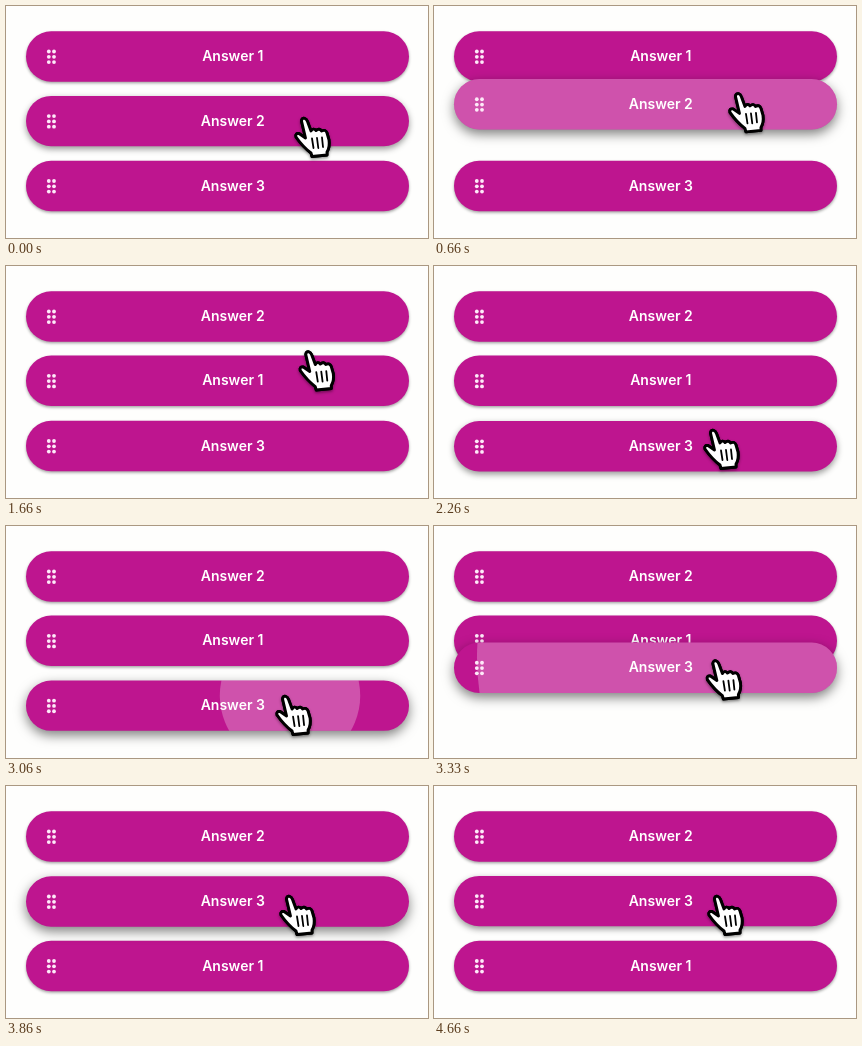
These frames come from a looping animation (422x232 px, 4.73 s). An HTML page with a canvas:

```html
<!DOCTYPE html>
<html lang="en">
<head>
<meta charset="utf-8">
<title>Reorder answers</title>
<style>
  html, body { margin: 0; height: 100%; overflow: hidden; background: #fefefd; }
  canvas { display: block; }
</style>
</head>
<body>
<canvas width="422" height="232"></canvas>
<script>
const LOOP = 4730;
const ROWS = [50.5, 114.8, 180];
const BAR = { x: 20, w: 383, h: 50.4 };
const ctx = document.querySelector('canvas').getContext('2d');

const ramp = (t, a, b) => Math.min(1, Math.max(0, (t - a) / (b - a)));
const ease = (t, a, b) => { const u = ramp(t, a, b); return u * u * (3 - 2 * u); };

// Start value followed by moves of [from ms, to ms, new value]
function track(t, value, ...moves) {
  for (const [a, b, next] of moves) value += (next - value) * ease(t, a, b);
  return value;
}

const hand = new Path2D(`M-2.5 4Q-2 .7 .6 1.3Q2.6 1.8 3.5 4.5L7 14
  Q9.5 10.5 12 13.5Q15.5 10.7 17.5 14Q21.5 12 23 16L25 23Q26 30 23 35
  L23 38L8 39.5L7 36Q-1 30 -8 20Q-9 16 -5 16.5L1.5 21Z`);
const creases = new Path2D('M8 21.5L9.5 31M13 21L14.3 31M18 20.5L19 30');

function shadow(color, y, blur) {
  ctx.shadowColor = color;
  ctx.shadowOffsetY = y;
  ctx.shadowBlur = blur;
}

function drawBar(label, cy, lift = 0, ripple) {
  cy += lift * 0.7;
  ctx.save();
  const pill = new Path2D();
  pill.roundRect(BAR.x, cy - BAR.h / 2, BAR.w, BAR.h, BAR.h / 2);
  ctx.fillStyle = '#be158f';
  shadow(`rgba(0,0,0,${0.36 + 0.14 * lift})`, 1.5 + 3 * lift, 3 + 9 * lift);
  ctx.fill(pill);
  shadow('transparent', 0, 0);

  if (ripple && ripple.alpha > 0) {
    ctx.save();
    ctx.clip(pill);
    ctx.fillStyle = `rgba(255,255,255,${ripple.alpha})`;
    ctx.beginPath();
    ctx.arc(ripple.x, cy - 10, ripple.r, 0, 7);
    ctx.fill();
    ctx.restore();
  }

  ctx.fillStyle = '#fdeaf8';
  for (let i = 0; i < 6; i++) {
    ctx.beginPath();
    ctx.arc(42.8 + (i % 2) * 5.2, cy - 5 + (i >> 1) * 5.3, 1.9, 0, 7);
    ctx.fill();
  }
  ctx.fillStyle = '#fff';
  ctx.font = '600 14px Inter, sans-serif';
  ctx.textAlign = 'center';
  ctx.fillText(label, 226.8, cy + 4.5);
  ctx.restore();
}

function drawHand(x, y) {
  ctx.save();
  ctx.translate(x, y);
  ctx.lineJoin = ctx.lineCap = 'round';
  ctx.lineWidth = 2.9;
  ctx.strokeStyle = '#000';
  ctx.fillStyle = '#fff';
  shadow('rgba(0,0,0,.45)', 1.5, 3);
  ctx.stroke(hand);
  shadow('transparent', 0, 0);
  ctx.fill(hand);
  ctx.stroke(hand);
  ctx.lineWidth = 1.8;
  ctx.stroke(creases);
  ctx.restore();
}

// Press spreads a light disc; release fades it
const ripple = (t, x, press, release) => ({
  x,
  r: 310 * ramp(t, press, press + 490),
  alpha: 0.26 * (1 - ease(t, release, release + 160))
});

function draw(now) {
  const t = now % LOOP;
  const [top, mid, low] = ROWS;
  ctx.fillStyle = '#fefefd';
  ctx.fillRect(0, 0, 422, 232);

  drawBar('Answer 1', track(t, top, [840, 1130, mid], [3430, 3720, low]));
  drawBar('Answer 2', track(t, mid, [440, 1090, top]),
    track(t, 0.4, [170, 400, 1], [1200, 1500, 0]),
    ripple(t, 300, 170, 980));
  drawBar('Answer 3', track(t, low, [3020, 3570, mid]),
    track(t, 0, [2050, 2250, 0.4], [2850, 3050, 1], [4000, 4350, 0.4]),
    ripple(t, 284, 2950, 3600));

  drawHand(
    track(t, 298, [400, 1030, 314], [1300, 2230, 279], [3020, 3570, 283]),
    track(t, 111, [400, 1030, 45], [1300, 2230, 163], [2500, 2800, 170], [3020, 3570, 109])
  );
  requestAnimationFrame(() => draw(performance.now() - start));
}

const start = performance.now();
draw(0);
</script>
</body>
</html>
```
